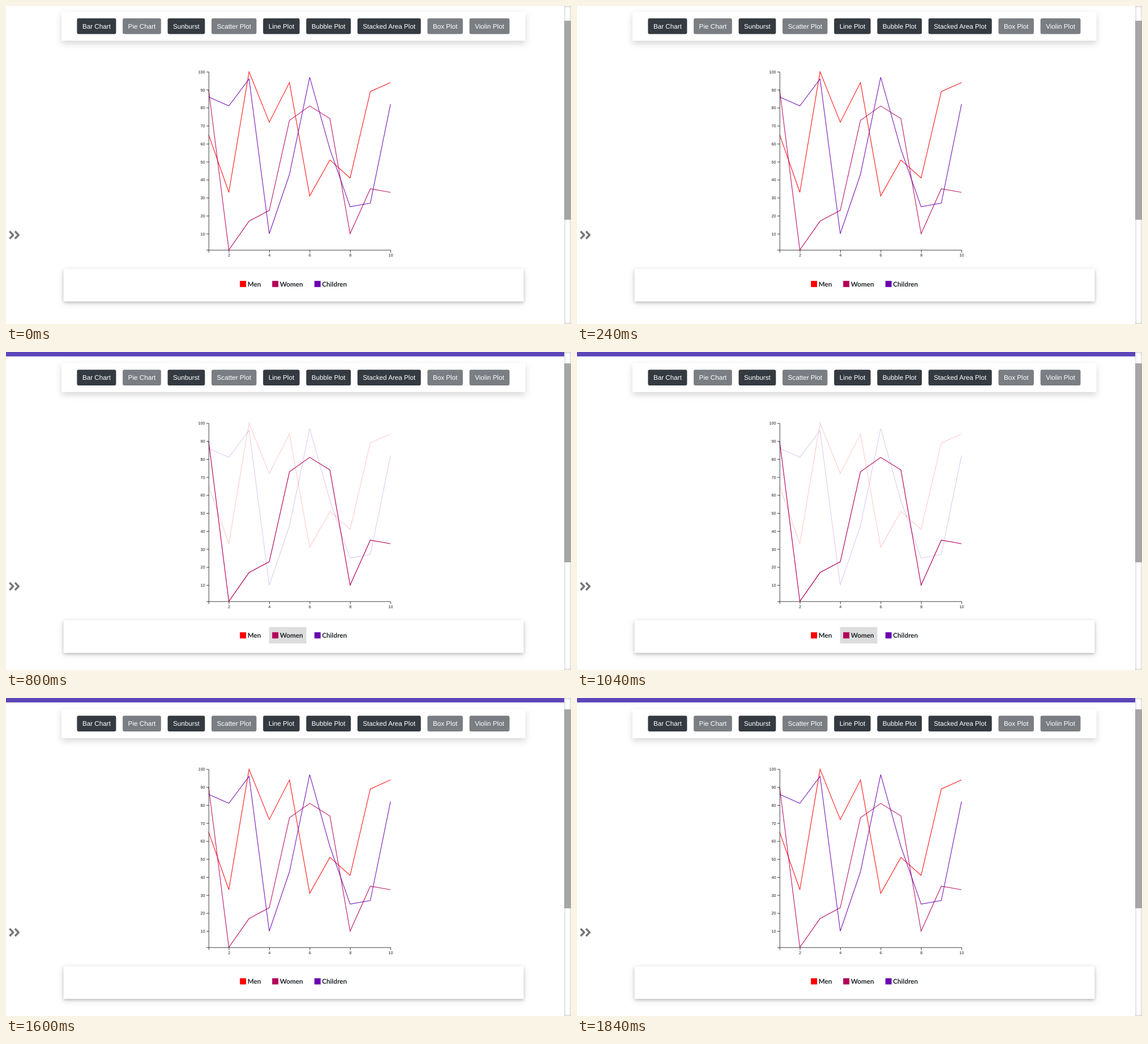
An HTML page for the animation above (2000 ms loop, 998 by 561 pixels).

```html
<!DOCTYPE html>
<html lang="en">
<head>
<meta charset="utf-8">
<title>Line plot</title>
<style>
  html, body { margin: 0; width: 100%; height: 100%; overflow: hidden; background: #fff; }
  body { position: relative; }
  svg { position: absolute; left: 0; top: 0; overflow: hidden; }
  text { text-rendering: geometricPrecision; }
  #menu { fill: #fff; filter: drop-shadow(0 5.8px 5.8px rgba(0,0,0,.16)); }
  #legendCard { fill: #fff;
    filter: drop-shadow(0 2.9px 2.9px rgba(0,0,0,.2)) drop-shadow(0 3px 6px rgba(0,0,0,.12)); }
  .button { font: 11.7px "Liberation Sans", Arial, sans-serif; fill: #fff; }
  .tick { font: 7.31px "Liberation Sans", Arial, sans-serif; fill: #222; }
  .legend { font: bold 11.7px Lato, sans-serif; fill: #212529; }
  .axis { fill: none; stroke: #222; stroke-width: .85; }
  .series { fill: none; stroke-width: 1.15; }
  .chevron { fill: none; stroke: #777; stroke-width: 3.5; stroke-linejoin: round; }
  #track { position: absolute; left: 986px; top: 0; width: 12px; height: 561px;
    background: #fff; box-shadow: inset 0 0 4px rgba(0,0,0,.3); }
  #thumb { position: absolute; left: 0; width: 12px; height: 351px; background: #a6a6a6; }
</style>
</head>
<body>
<svg width="998" height="561">
  <g id="page">
    <rect y="-60" width="998" height="58.3" fill="#5b45b9"/>
    <rect id="menu" x="98" y="10" width="819.5" height="51.2"/>
    <rect id="legendCard" x="101.5" y="463.6" width="813" height="57.7"/>
  </g>
</svg>
<div id="track"><div id="thumb"></div></div>
<script>
const page = document.getElementById('page');
const thumb = document.getElementById('thumb');

const buttons = ['Bar Chart', 'Pie Chart', 'Sunburst', 'Scatter Plot', 'Line Plot',
  'Bubble Plot', 'Stacked Area Plot', 'Box Plot', 'Violin Plot'];
const disabled = ['Pie Chart', 'Scatter Plot', 'Box Plot', 'Violin Plot'];
const series = [
  { name: 'Men', color: '#ff0000', x: 413.2, boxWidth: 48.3,
    values: [65, 33, 100, 72, 94, 31, 51, 41, 89, 94] },
  { name: 'Women', color: '#b30059', x: 470.2, boxWidth: 65.9,
    values: [90, 1, 17, 23, 73, 81, 74, 10, 35, 33] },
  { name: 'Children', color: '#6a00b0', x: 544.8, boxWidth: 69.3,
    values: [86, 81, 96, 10, 43, 97, 57, 25, 27, 82] }
];

const xAt = v => 358.3 + (v - 1) * 35.7;
const yAt = v => 116.4 + (100 - v) * 3.175;

function add(tag, attributes, text = '', parent = page) {
  const node = document.createElementNS('http://www.w3.org/2000/svg', tag);
  for (const key in attributes) node.setAttribute(key, attributes[key]);
  node.textContent = text;
  return parent.appendChild(node);
}

let buttonX = 125.4;
for (const label of buttons) {
  const group = add('g', { opacity: disabled.includes(label) ? .65 : 1 });
  const box = add('rect', { x: buttonX, y: 21.7, height: 27.8, rx: 2.9, fill: '#343a40' }, '', group);
  const text = add('text', { x: buttonX + 9.5, y: 39.5, class: 'button' }, label, group);
  const width = text.getComputedTextLength() + 19;
  box.setAttribute('width', width);
  buttonX += width + 11.7;
}

for (const x of [6.4, 15.9])
  add('path', { d: `M${x} 397.6l6.3 6.4l-6.3 6.4`, class: 'chevron' });

// Axes sit half a source pixel right of and below the plotted lines.
const lines = add('g', { transform: 'translate(-.37 -.37)' });
for (const s of series) {
  const points = s.values.map((v, i) => `${xAt(i + 1)},${yAt(v)}`).join(' ');
  s.line = add('polyline', { points, stroke: s.color, class: 'series' }, '', lines);
  s.highlight = add('rect', { x: s.x - 5.6, y: 475.8, width: s.boxWidth, height: 29, fill: '#ddd' });
  add('rect', { x: s.x, y: 484.9, width: 10.9, height: 10.9, fill: s.color });
  add('text', { x: s.x + 13.5, y: 494.5, class: 'legend' }, s.name);
}

const left = xAt(1), right = xAt(10), bottom = yAt(1);
add('path', { d: `M${left - 4.4} ${bottom}H${right}M${left} ${yAt(100)}V${bottom + 4.4}`, class: 'axis' });
for (let v = 10; v <= 100; v += 10) {
  add('path', { d: `M${left} ${yAt(v)}h-4.4`, class: 'axis' });
  add('text', { x: left - 6.6, y: yAt(v) + 2.4, class: 'tick', 'text-anchor': 'end' }, v);
}
for (let v = 2; v <= 10; v += 2) {
  add('path', { d: `M${xAt(v)} ${bottom}v4.4`, class: 'axis' });
  add('text', { x: xAt(v), y: bottom + 11.3, class: 'tick', 'text-anchor': 'middle' }, v);
}

function draw(now) {
  const step = Math.floor(now % 2000 / 400);
  const hovered = series[step - 1];
  page.setAttribute('transform', `translate(0 ${step ? 9.5 : 0})`);
  thumb.style.top = step ? '20px' : '26px';
  for (const s of series) {
    s.line.setAttribute('opacity', !hovered ? .88 : s === hovered ? 1 : .2);
    s.highlight.setAttribute('visibility', s === hovered ? 'visible' : 'hidden');
  }
  requestAnimationFrame(draw);
}
draw(performance.now());
</script>
</body>
</html>
```
